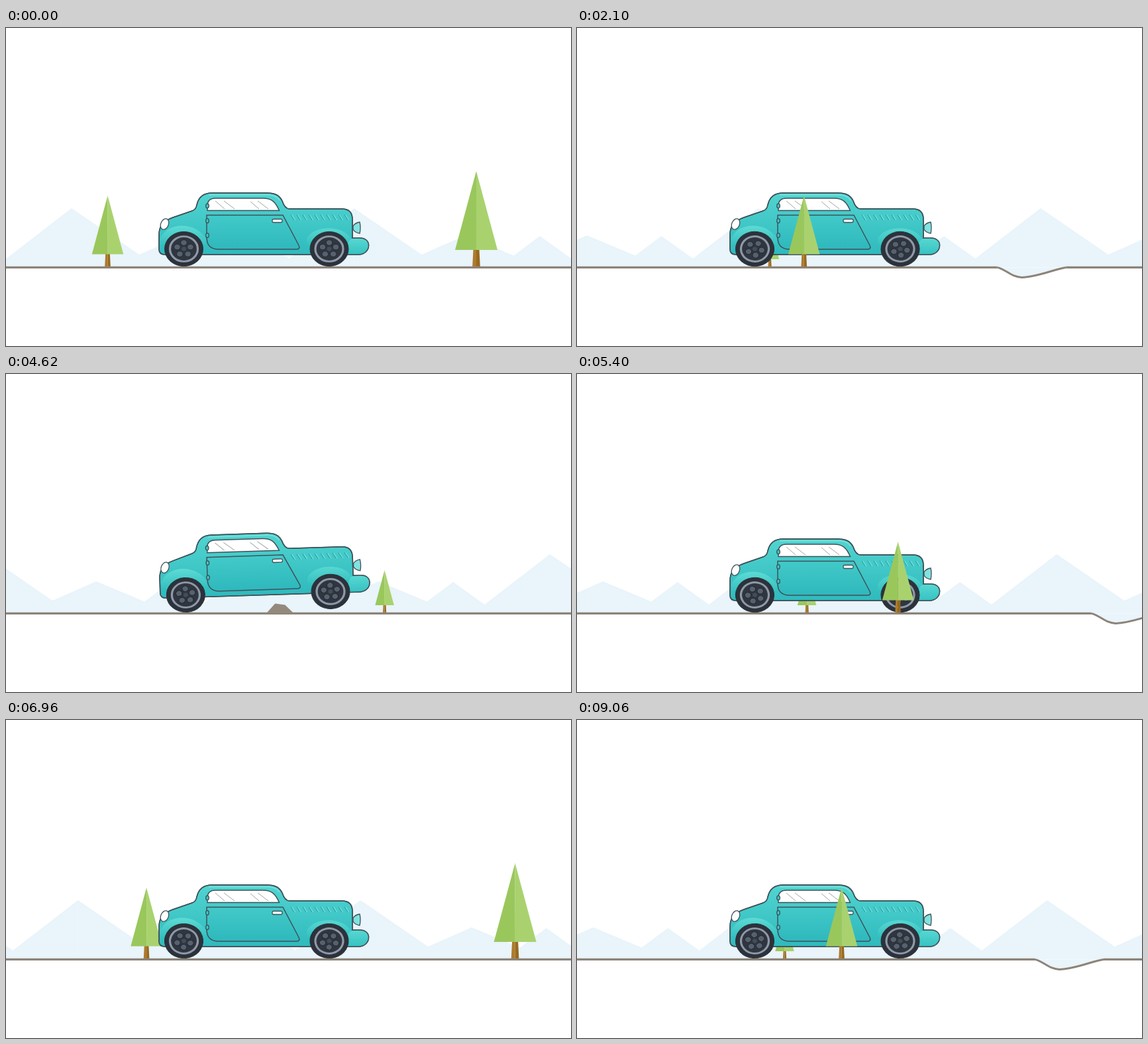
Animation, 853 px wide and 480 px high, one loop 9120 ms. Source, as an HTML page with a canvas:

```html
<!DOCTYPE html>
<html lang="en">
<head>
<meta charset="utf-8">
<title>Vintage car drive</title>
<style>
html, body { margin: 0; width: 100%; height: 100%; overflow: hidden; background: #fff; }
canvas { display: block; width: 853px; height: 480px; }
</style>
</head>
<body>
<canvas id="stage" width="853" height="480"></canvas>
<script>
const ctx = document.getElementById('stage').getContext('2d');
const WIDTH = 853, ROAD_Y = 361.4;
const LOOP = 9120, TICK = 60, CYCLE = 88;
const INK = '#3f5159', GROUND = '#8d8378', HAZE = '#e9f4fb';
const ROAD_SPEED = 28.38, TREE_SPEED = 29.3, SMALL_SPEED = 11.22;

const BODY = new Path2D(`M231 334 V312 C231 298 238 291 252 286 L281 276 Q287 274 288 267
  C291 254 299 249 311 249 H394 C407 249 413 253 417 261 Q421 273 428 273 H507
  C519 273 523 279 523 289 V317 H534 C543 317 547.5 322 547.5 328 C547.5 336 541 342 532 342
  H240 Q231 342 231 334 Z`);
const WINDOW = new Path2D('M304 275.5 V267 Q305 257 316 257 H388 C402 257 407 263 412.5 275.5 Z');
const DOOR = new Path2D('M303 282.5 H418 L442 328 Q445 334 438 334 H321 Q303 334 303 316 Z');
const GLASS_SHINE = new Path2D('M316 261 L330 273 M329 261 L345 273 M369 262 L382 273 M380 261 L396 273');
const HEADLIGHT = new Path2D('M524 299 Q527 294 534 293 Q536 301 534 310 Q527 309 524 304 Z');

function gradient(y0, y1, from, to) {
  const g = ctx.createLinearGradient(0, y0, 0, y1);
  g.addColorStop(0, from);
  g.addColorStop(1, to);
  return g;
}
const PAINT = gradient(249, 342, '#51d4d0', '#2fbabd');
const DOOR_PAINT = gradient(282, 334, '#42cac9', '#2fb8bc');
const FENDER_PAINT = gradient(299, 326, '#5ddad4', '#37c2c2');
const BUMPER_PAINT = gradient(317, 342, '#58d8d2', '#36c2c2');

function polygon(color, points) {
  ctx.fillStyle = color;
  ctx.beginPath();
  points.forEach(([x, y]) => ctx.lineTo(x, y));
  ctx.fill();
}

function shape(path, fill, line = INK, width = 1.5) {
  ctx.lineWidth = width;
  ctx.strokeStyle = line;
  if (fill) { ctx.fillStyle = fill; ctx.fill(path); }
  if (line) ctx.stroke(path);
}

function ellipse(x, y, rx, ry, angle = 0) {
  const p = new Path2D();
  p.ellipse(x, y, rx, ry, angle, 0, 7);
  return p;
}

function mountains(n) {
  const tile = WIDTH / 2;
  const profile = [[0, 272], [102, 342], [168, 313], [241, 343.5], [280.5, 314], [328, 348], [tile, 272]];
  const start = 99 - n / CYCLE * tile;
  for (let k = -1; k < 3; k++) {
    const x = start + k * tile;
    polygon(HAZE, [...profile.map(([dx, y]) => [x + dx, y]), [x + tile, 361], [x, 361]]);
  }
}

function tree(x, scale) {
  if (x < -40 || x > WIDTH + 40) return;
  ctx.save();
  ctx.translate(x, 360);
  ctx.scale(scale, scale);
  polygon('#ad7b2d', [[-4.5, -26], [0, -26], [0, 0], [-5.8, 0]]);
  polygon('#98691f', [[0, -26], [4.5, -26], [5.8, 0], [0, 0]]);
  polygon('#9ac75c', [[0, -144], [0.3, -25], [-32, -25]]);
  polygon('#a9d26f', [[0, -144], [32, -25], [0, -25]]);
  ctx.restore();
}

function backTrees(n) {
  const span = CYCLE * TREE_SPEED;
  for (const [x, scale] of [[153.5, 0.743], [710, 1], [2434, 1]])
    for (const wrap of [0, span]) tree(x + wrap - n * TREE_SPEED, scale);
}

function road(n) {
  const hole = 2110 - n * ROAD_SPEED, bump = 1159.5 - n * ROAD_SPEED;
  const dip = new Path2D(`M${hole} ${ROAD_Y} c13 2.5 21 14.5 37 15 c25 -.5 49 -12.5 67 -15`);
  const flat = new Path2D(`M-5 ${ROAD_Y} H${Math.max(-5, hole)}
    M${Math.min(WIDTH + 5, hole + 104)} ${ROAD_Y} H${WIDTH + 5}`);
  shape(dip, HAZE, GROUND, 3);
  shape(flat, null, GROUND, 3.3);
  polygon('#938a7d', [[bump, 361], [bump + 13, 346.5], [bump + 28, 348.5], [bump + 41, 361]]);
}

function pulse(n, center, halfWidth) {
  const d = Math.abs(n - center) / halfWidth;
  return d < 1 ? Math.cos(d * Math.PI / 2) ** 2 : 0;
}

function wheel(x, y, angle) {
  ctx.save();
  ctx.translate(x, y);
  ctx.scale(1, 0.9);
  ctx.rotate(angle);
  shape(ellipse(0, 0, 29, 29), '#2c323b', '#2a3038', 1);
  shape(ellipse(0, 0, 21, 21), '#30363f', '#8f99a8', 3.2);
  for (let i = 0; i < 5; i++) {
    const a = i * Math.PI * 0.4 - Math.PI / 2;
    shape(ellipse(10.5 * Math.cos(a), 10.5 * Math.sin(a), 4.8, 4.8), '#566170', '#22282f', 1);
  }
  shape(ellipse(0, 0, 3.5, 3.5), '#434d59', null);
  ctx.restore();
}

function carBody() {
  shape(BODY, PAINT);
  ctx.save();
  ctx.clip(BODY);
  shape(new Path2D('M233 318 C243 292 288 292 302 319 V327 H233 Z'), FENDER_PAINT, null);
  shape(new Path2D('M454 318 C465 297 510 297 521 319 V327 H454 Z'), FENDER_PAINT, null);
  shape(new Path2D('M516 342 Q512 317 528 317 H550 V342 Z'), BUMPER_PAINT, null);
  shape(new Path2D('M306 252 H396 Q408 252 413 260'), null, '#78e2dd', 1.5);
  ctx.restore();
  shape(BODY, null);
  shape(DOOR, DOOR_PAINT);
  shape(WINDOW, '#fff');
  shape(GLASS_SHINE, null, '#a0a6a9', 1);
  for (const y of [268.5, 291, 313]) shape(ellipse(304, y, 2.3, 3.3), '#3fc6c7', INK, 1.3);
  const handle = new Path2D();
  handle.roundRect(402, 288.5, 15, 5, 2);
  shape(handle, '#fff', INK, 1.3);
  for (let x = 430; x < 512; x += 9) {
    shape(new Path2D(`M${x} 282 l5 8`), null, '#2ba5ab', 1.3);
    shape(new Path2D(`M${x + 1.6} 282 l5 8`), null, '#7ce4df', 1.1);
  }
  shape(HEADLIGHT, '#82e2df', INK, 1.3);
  shape(ellipse(239.5, 296, 5.8, 8.5, 0.4), '#fff', INK, 1.3);
}

function car(n) {
  // The body follows the wheels slightly late and swings further.
  const frontWheel = -11 * pulse(n, 24.4, 5) + 13 * pulse(n, 58.5, 5);
  const rearWheel = -11 * pulse(n, 32.1, 5) + 13 * pulse(n, 66.2, 5);
  const front = -14 * pulse(n, 25.4, 6) + 15 * pulse(n, 59, 6);
  const rear = -14 * pulse(n, 33, 6) + 18.5 * pulse(n, 66.2, 6);
  const frontLift = front + 0.4 * rear, rearLift = rear + 0.4 * front;
  const tilt = Math.atan2(frontLift - rearLift, 220);
  const shift = Math.min(3, Math.abs(tilt) * 90);

  ctx.save();
  ctx.translate(268 + shift * 0.6, 333 + rearLift);
  ctx.rotate(tilt);
  ctx.translate(-268, -333);
  carBody();
  ctx.restore();

  const spin = n / CYCLE * Math.PI * 26;
  wheel(268.5 + shift, 333.5 + rearWheel, spin);
  wheel(488 + shift * 0.7, 333.5 + frontWheel, spin);
}

function draw(now) {
  const tick = Math.floor((now % LOOP) / TICK);
  const n = Math.floor(tick * 1.5) % CYCLE;
  ctx.fillStyle = '#fff';
  ctx.fillRect(0, 0, WIDTH, 480);
  mountains(n);
  tree(874.5 - n * SMALL_SPEED, 0.444);
  backTrees(n);
  road(n);
  car(n);
  tree(1818.5 - n * ROAD_SPEED, 0.743);
}

const startTime = performance.now();
function animate() {
  draw(performance.now() - startTime);
  requestAnimationFrame(animate);
}
animate();
</script>
</body>
</html>
```
